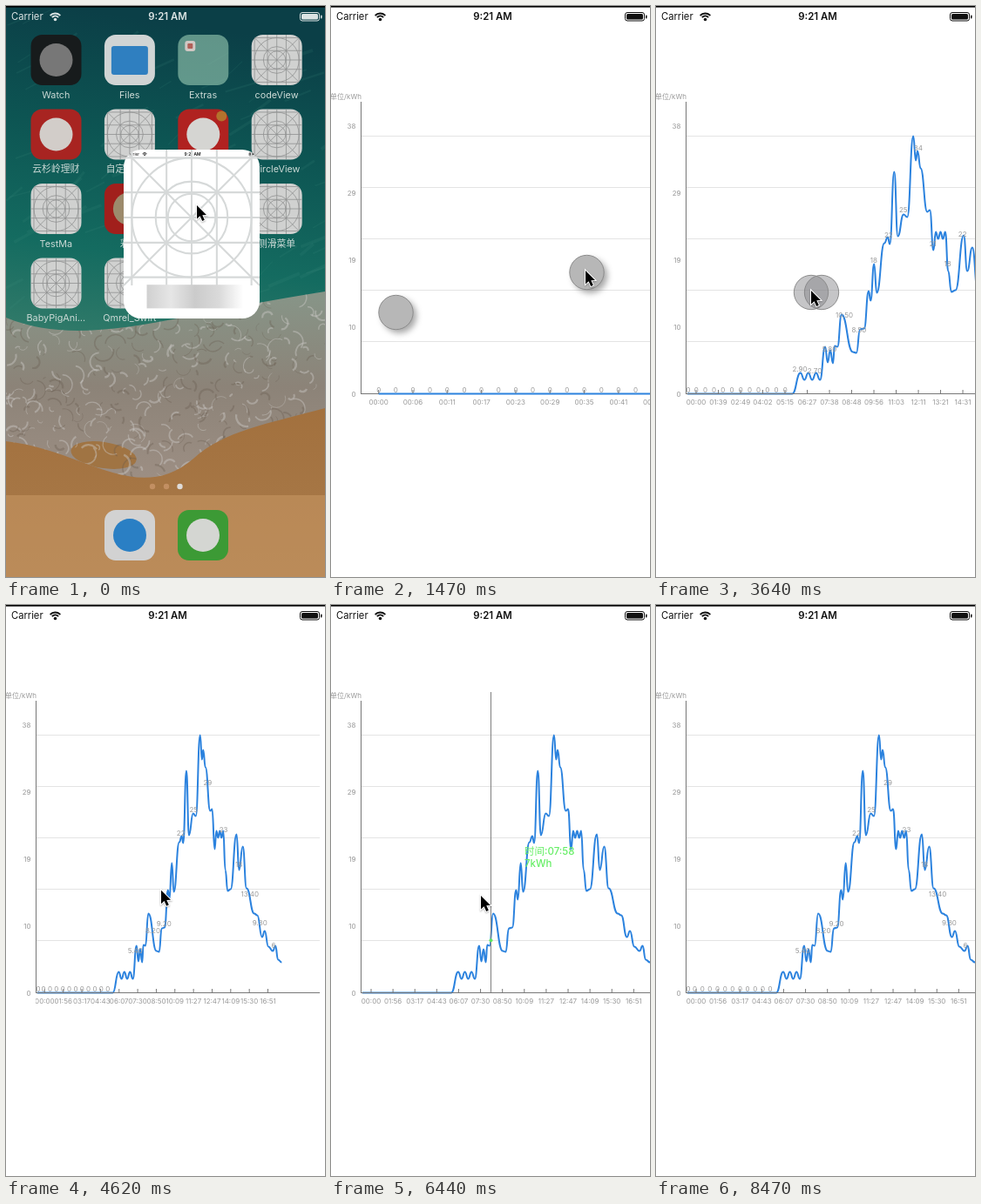
Write an HTML page with a canvas that moves like this. It is 366 px wide and 656 px high and loops after 8960 ms.

```html
<!DOCTYPE html>
<html lang="en">
<head>
<meta charset="utf-8">
<title>Energy chart</title>
<style>
html, body { margin: 0; width: 100%; height: 100%; overflow: hidden; background: #fff; }
canvas { display: block; width: 366px; height: 656px; }
</style>
</head>
<body>
<canvas id="stage" width="366" height="656"></canvas>
<script>
const W = 366, H = 656, LOOP = 8960, STEP = 70;
const LEFT = 35, BASE = 445;
const FONT = 'Inter, "Noto Sans CJK SC", "Noto Sans CJK", sans-serif';
const g = document.getElementById('stage').getContext('2d');

// A jagged run of points alternating between two heights.
const zigzag = (n, x, dx, high, low) =>
  Array.from({ length: n }, (_, i) => [x + i * dx, i % 2 ? low : high]);

// Load curve at zoom 1.
const RISE = [
  [170, 391], [172.5, 409], [175, 395], [177.6, 410], [179.3, 390], [182, 391], [186, 354],
  [197, 397], [200.5, 398], [204, 371], [208, 370], [212.4, 327], [214.3, 338], [217.7, 296],
  [220.3, 329], [227.7, 272], [231, 265], [233, 273], [237.3, 190], [240.8, 264], [246.4, 239],
  [250, 242], [255.9, 149]
];
const FALL = [
  [289.9, 304], [293, 328], [297, 326], [305, 263], [308.4, 304], [313.4, 277], [318.5, 325],
  [329, 354], [333, 356], [339.5, 381], [343, 374], [348, 392], [354, 397], [357.5, 391],
  [361, 407], [366, 410]
];
const CURVE = [
  [36, BASE], [138, BASE], ...zigzag(6, 146, 3.8, 421, 429), ...RISE,
  [258.3, 177], [260, 166], [263, 186], [269.5, 236], [272, 234], [275.5, 280],
  ...zigzag(5, 277.8, 2.3, 259, 267), ...FALL
];

// Places of the value labels, by zoom.
const spread = (n, x, dx) => Array.from({ length: n }, (_, i) => x + i * dx);
const MARKS = {
  far: spread(8, 143.6, 9.7),
  mid: spread(12, 145.4, 14.4),
  near: [168.3, 192, 207, 230, 247, 266, 287.5, 308, 323, 336.5, 355]
};

// Tracks: [time, value...]
const ZOOM = [[1540, 22.7, 0], [1960, 6, 0], [2240, 6, 20], [2590, 2.145, 60], [3640, 1.178, 0],
  [3990, 1.13, 0], [4340, 1.13, 0], [4550, 0.85, 0], [6020, 0.85, 0], [6230, 1, 0]]
  .map(([t, s, scroll]) => [t, Math.log(s), scroll]);
const CURSOR = [[840, 219, 229], [1330, 292, 304], [1540, 292, 304], [1960, 205, 312],
  [2240, 112, 314], [2590, 150, 320], [3640, 178, 327], [6090, 178, 329], [6230, 205, 332],
  [6440, 172, 334], [6720, 112, 336], [7350, 256, 338], [7770, 180, 338], [7910, 180, 340], [8400, 240, 662]];
const FINGER = [[1540, 293.5, 306], [1960, 206, 314], [2240, 115, 316], [2590, 157, 322],
  [3640, 178, 329], [3990, 182, 329]];

function track(keys, t) {
  if (t <= keys[0][0]) return keys[0].slice(1);
  for (let i = 1; i < keys.length; i++) {
    const a = keys[i - 1], b = keys[i];
    if (t <= b[0]) {
      const p = (t - a[0]) / (b[0] - a[0]);
      return a.slice(1).map((v, j) => v + (b[j + 1] - v) * p);
    }
  }
  return keys[keys.length - 1].slice(1);
}

const mix = (a, b, p) => a + (b - a) * p;

function text(c, str, x, y, size, color, align = 'center', weight = 400) {
  c.font = `${weight} ${size}px ${FONT}`;
  c.textAlign = align;
  c.textBaseline = 'middle';
  c.fillStyle = color;
  c.fillText(str, x, y);
}

function line(c, x1, y1, x2, y2, color, width = 1) {
  c.strokeStyle = color;
  c.lineWidth = width;
  c.beginPath();
  c.moveTo(x1, y1);
  c.lineTo(x2, y2);
  c.stroke();
}

function disc(c, x, y, r, color) {
  c.fillStyle = color;
  c.beginPath();
  c.arc(x, y, r, 0, 7);
  c.fill();
}

function box(c, x, y, w, h, r, color) {
  c.fillStyle = color;
  c.beginPath();
  c.roundRect(x, y, w, h, r);
  c.fill();
}

// Linear gradient with evenly spaced colours.
function fade(c, x1, y1, x2, y2, ...colors) {
  const f = c.createLinearGradient(x1, y1, x2, y2);
  colors.forEach((color, i) => f.addColorStop(i / (colors.length - 1), color));
  return f;
}

function statusBar(c, color) {
  text(c, 'Carrier', 6, 12.5, 11.2, color, 'left');
  text(c, '9:21 AM', 185.5, 12.5, 11.4, color, 'center', 600);
  c.strokeStyle = color;
  c.lineWidth = 1.9;
  for (const r of [8, 5]) {
    c.beginPath();
    c.arc(56.5, 16.5, r, -Math.PI * 0.76, -Math.PI * 0.24);
    c.stroke();
  }
  disc(c, 56.5, 15.5, 1.8, color);
  c.lineWidth = 1;
  c.beginPath();
  c.roundRect(337.5, 7.5, 22, 9.5, 2.5);
  c.stroke();
  box(c, 339, 9, 19, 6.5, 1.5, color);
  box(c, 361, 10.5, 1.5, 4, 1, color);
}

// Blueprint icon on a square of side w.
function blueprint(c, x, y, w, color) {
  c.save();
  c.translate(x, y);
  const width = Math.max(0.7, w / 75);
  for (const p of [0.06, 0.315, 0.5, 0.685, 0.94]) {
    line(c, 0, p * w, w, p * w, color, width);
    line(c, p * w, 0, p * w, w, color, width);
  }
  line(c, 0, 0, w, w, color, width);
  line(c, w, 0, 0, w, color, width);
  for (const r of [0.44, 0.265, 0.175]) {
    c.beginPath();
    c.arc(w / 2, w / 2, r * w, 0, 7);
    c.stroke();
  }
  c.restore();
}

function makeWallpaper() {
  const cv = document.createElement('canvas');
  cv.width = W;
  cv.height = H;
  const c = cv.getContext('2d');
  let seed = 7;
  const rnd = () => (seed = seed * 16807 % 2147483647) / 2147483647;
  c.fillStyle = fade(c, 60, 0, 0, 400, '#0b3f47', '#0d5553', '#146b60', '#3a7f6c');
  c.fillRect(0, 0, W, H);
  for (let i = 0; i < 90; i++) {
    const x = rnd() * W, y = 20 + rnd() * 330;
    line(c, x, y, x + 12 + rnd() * 26, y - 8 - rnd() * 10, 'rgba(70,150,130,.13)', 1 + rnd() * 3);
  }
  c.fillStyle = fade(c, 0, 450, 0, H, '#a2703d', '#a97b4b');
  c.fillRect(0, 455, W, H - 455);

  c.save();
  c.beginPath();
  c.moveTo(0, 358);
  c.bezierCurveTo(90, 395, 190, 355, W, 328);
  c.lineTo(W, 462);
  c.bezierCurveTo(300, 480, 250, 488, 215, 520);
  c.bezierCurveTo(150, 575, 90, 510, 0, 500);
  c.closePath();
  c.fillStyle = fade(c, 0, 335, 0, 540, '#879487', '#8c8378', '#9c8e83');
  c.fill();
  c.clip();
  c.fillStyle = '#a07443';
  c.beginPath();
  c.ellipse(112, 516, 38, 15, 0.15, 0, 7);
  c.fill();
  for (let i = 0; i < 420; i++) {
    const x = rnd() * W, y = 330 + rnd() * 210, a = rnd() * 6.3;
    c.strokeStyle = rnd() > 0.4 ? 'rgba(205,203,200,.42)' : 'rgba(100,88,76,.32)';
    c.lineWidth = 0.7 + rnd() * 1.8;
    c.beginPath();
    c.arc(x, y, 3 + rnd() * 9, a, a + 1 + rnd() * 2);
    c.stroke();
  }
  c.restore();
  c.fillStyle = 'rgba(205,155,105,.5)';
  c.fillRect(0, 562, W, H - 562);
  return cv;
}
const wallpaper = makeWallpaper();

const APPS = [
  ['Watch', '#171b1c', '#777'], ['Files', '#d0d4d4', '#2f7fc0'], ['Extras', 'rgba(135,185,165,.7)'], ['codeView'],
  ['云杉岭理财', '#a82421', '#d2cdc9'], ['自定义视图'], ['贷款', '#b02220', '#d5d5d2'], ['CircleView'],
  ['TestMa'], ['彩票', '#a11f1c', '#9c8a6c'], ['动画'], ['侧滑菜单'],
  ['BabyPigAni…'], ['Qmrel_Swift']
];

function appTile(x, y, fill, mark, square) {
  box(g, x, y, 58, 58, 13, fill || '#d0d1d0');
  if (square) box(g, x + 8, y + 13, 42, 33, 3, mark);
  else if (mark) disc(g, x + 29, y + 29, 19, mark);
}

function home(p) {
  g.drawImage(wallpaper, 0, 0);
  statusBar(g, '#dce4e4');
  g.save();
  g.globalAlpha = 1 - p;
  g.translate(225, 233);
  g.scale(1 + p * 1.3, 1 + p * 1.3);
  g.translate(-225, -233);
  APPS.forEach(([name, fill, mark], i) => {
    const x = 28.5 + (i % 4) * 84.4, y = 33 + Math.floor(i / 4) * 85.5;
    appTile(x, y, fill, mark, name === 'Files');
    if (!fill) {
      g.save();
      g.beginPath();
      g.roundRect(x, y, 58, 58, 13);
      g.clip();
      blueprint(g, x, y, 58, '#8e9090');
      g.restore();
    }
    if (name === 'Extras') {
      box(g, x + 8, y + 7, 12, 12, 3, '#d0c8c4');
      box(g, x + 11, y + 10, 6, 6, 1, '#b06058');
    }
    if (i === 6) disc(g, x + 50, y + 8, 6, '#b3722d');
    text(g, name, x + 28.8, y + 69.5, 10.8, '#ccdad6');
  });
  g.restore();
  [168, 184, 199.5].forEach((x, i) => disc(g, x, 552, 3.2, i === 2 ? '#dedbd8' : '#c28f62'));
  appTile(113, 579, '#d2d2d2', '#2a7fc4');
  appTile(197, 579, '#3c9a35', '#d4d6d2');
}

function launch(t) {
  const q = Math.min(1, t / 420), p = 1 - (1 - q) ** 2;
  home(p);
  const x = mix(135, 0, p), y = mix(165, 0, p), w = mix(156, W, p), h = mix(194, H, p);
  g.save();
  g.beginPath();
  g.roundRect(x, y, w, h, mix(20, 0, p));
  g.clip();
  g.fillStyle = '#fff';
  g.fillRect(x, y, w, h);
  g.save();
  g.translate(x, y);
  g.scale(w / W, w / W);
  statusBar(g, '#111');
  g.restore();
  g.globalAlpha = Math.max(0, 1 - p * 1.1);
  blueprint(g, x, y, w, '#d6d9d9');
  g.fillStyle = fade(g, x + w * 0.17, 0, x + w * 0.88, 0, '#d0d0d0', '#e6e6e6', '#cbcbcb', '#dadada', '#fff');
  g.fillRect(x + w * 0.17, y + h * 0.8, w * 0.72, h * 0.14);
  g.restore();
}

function curveY(x) {
  const i = CURVE.findIndex(p => x <= p[0]);
  if (i < 1) return i ? 410 : BASE;
  const [a, b] = [CURVE[i - 1], CURVE[i]];
  const p = (x - a[0]) / (b[0] - a[0]);
  return mix(a[1], b[1], p * p * (3 - 2 * p));
}

// Time of day at a place on the curve.
function clock(x) {
  const n = (x - 46) / 25.1;
  const bend = n > 2 && n < 8.2 ? 8.5 * Math.sin(Math.PI * (n - 2) / 6.2) : 0;
  const m = Math.max(0, Math.floor(n < 0 ? 34.45 + 84.85 * n : 34.6 + 81.4 * n + bend));
  const two = v => String(v).padStart(2, '0');
  return two(Math.floor(m / 60)) + ':' + two(m % 60);
}

function valueText(v) {
  return v > 15 || v % 1 < 0.15 ? String(Math.round(v)) : v.toFixed(1) + '0';
}

function chart(t) {
  const [z, scroll] = track(ZOOM, t), s = Math.exp(z);
  const pressed = t >= 5740 && t < 7910;
  const right = s < 0.9 ? 360 : W;
  const d = 0.866 * s;
  const toX = x => LEFT - scroll + (x - LEFT) * s;
  const toUnit = x => LEFT + (x - LEFT + scroll) / s;

  text(g, '单位/kWh', 35, 105, 8, '#999', 'right');
  [38, 29, 19, 10, 0].forEach((v, i) => text(g, v, 28.5, 138.5 + i * 77, 8, '#999', 'right'));
  for (let i = 0; i < 5; i++) line(g, LEFT, 149.5 + i * 59, right, 149.5 + i * 59, '#e4e4e4');

  const axis = () => line(g, 34, 445.5, right, 445.5, '#777');
  if (s > 5) axis();

  g.save();
  g.beginPath();
  g.rect(34, 90, W - 34, 380);
  g.clip();
  g.strokeStyle = '#2b82de';
  g.lineWidth = 2;
  g.lineJoin = 'round';
  g.beginPath();
  let px = toX(35.866), py = BASE + 0.5;
  g.moveTo(px, py);
  for (const [ux, uy] of CURVE.slice(1)) {
    const x = toX(ux), y = uy + 0.5, mid = (px + x) / 2;
    g.bezierCurveTo(mid, py, mid, y, x, y);
    [px, py] = [x, y];
  }
  g.stroke();
  if (s <= 5) axis();

  // Time labels
  const gap = Math.min(29, Math.ceil(25 / d - 0.01)) * d;
  const first = LEFT - scroll + Math.max(11 * Math.min(1, s), d);
  for (let n = 0, x = first; x < right + 12; x = first + ++n * gap) {
    if (x < 22 || (s < 1.1 && n > 12)) continue;
    line(g, x, 441, x, 445, '#777');
    text(g, n ? clock(toUnit(x)) : '00:00', x, 456, 8, '#999');
  }

  // Value labels
  if (!pressed) {
    const skip = Math.min(10, Math.ceil(9.2 / d));
    for (let x = 35.866; x < 138; x += skip * 0.866) {
      const sx = Math.max(toX(x), toX(LEFT) + 2);
      if (sx > 30 && sx < W + 5) text(g, '0', sx, 441.5, 8, '#999');
    }
    for (const x of s < 1.1 ? MARKS.near : s < 1.6 ? MARKS.mid : MARKS.far) {
      const y = curveY(x);
      text(g, valueText((BASE - y) / 8.1), toX(x), y - 4, 8, '#999');
    }
  }
  g.restore();
  line(g, 34.5, 110, 34.5, 446, '#777');

  if (pressed) {
    const x = track(CURSOR, t - STEP)[0], u = toUnit(x), y = curveY(u);
    line(g, Math.round(x) + 0.5, 100, Math.round(x) + 0.5, BASE, '#808080');
    disc(g, x + 0.5, y, 2, '#5fe85f');
    text(g, '时间:' + clock(u - 2.8), x + 39, 283.5, 11.5, '#66ee66', 'left', 500);
    text(g, Math.round((BASE - y) / 8.1) + 'kWh', x + 39, 298, 11.5, '#66ee66', 'left', 500);
  }
}

function touches(t) {
  if (t < 1190 || t >= 4270) return;
  const [x, y] = track(FINGER, t);
  const hover = t < 1540 || (t > 1960 && t < 2240);
  for (const [cx, cy] of [[368 - x, 658 - y], [x, y]]) {
    g.save();
    if (hover) {
      g.shadowColor = 'rgba(0,0,0,.35)';
      g.shadowBlur = 7;
      g.shadowOffsetX = g.shadowOffsetY = 4;
    }
    disc(g, cx, cy, 19.7, hover ? '#b7b7b7' : 'rgba(130,130,134,.46)');
    g.restore();
    g.strokeStyle = '#8c8c8c';
    g.lineWidth = 1;
    g.beginPath();
    g.arc(cx, cy, 19.7, 0, 7);
    g.stroke();
  }
}

const ARROW = new Path2D('M0 0V15.5L3.6 12.2L6.2 18L8.8 16.8L6.3 11.3L11 11Z');

function pointer(t) {
  if (t >= 8400) return;
  g.save();
  g.translate(...track(CURSOR, t));
  g.shadowColor = 'rgba(0,0,0,.3)';
  g.shadowBlur = 2;
  g.shadowOffsetY = 1;
  g.strokeStyle = '#fff';
  g.lineWidth = 2;
  g.stroke(ARROW);
  g.shadowColor = 'transparent';
  g.fillStyle = '#000';
  g.fill(ARROW);
  g.restore();
}

function draw(t) {
  g.fillStyle = '#fff';
  g.fillRect(0, 0, W, H);
  if (t < 490) {
    launch(t);
  } else {
    statusBar(g, '#111');
    chart(t);
    touches(t);
  }
  g.fillStyle = '#000';
  g.fillRect(0, 0, W, 1.6);
  pointer(t);
}

const start = performance.now();
function tick() {
  const t = Math.max(0, performance.now() - start) % LOOP;
  draw(Math.floor(t / STEP) * STEP);
  requestAnimationFrame(tick);
}
tick();
</script>
</body>
</html>
```
